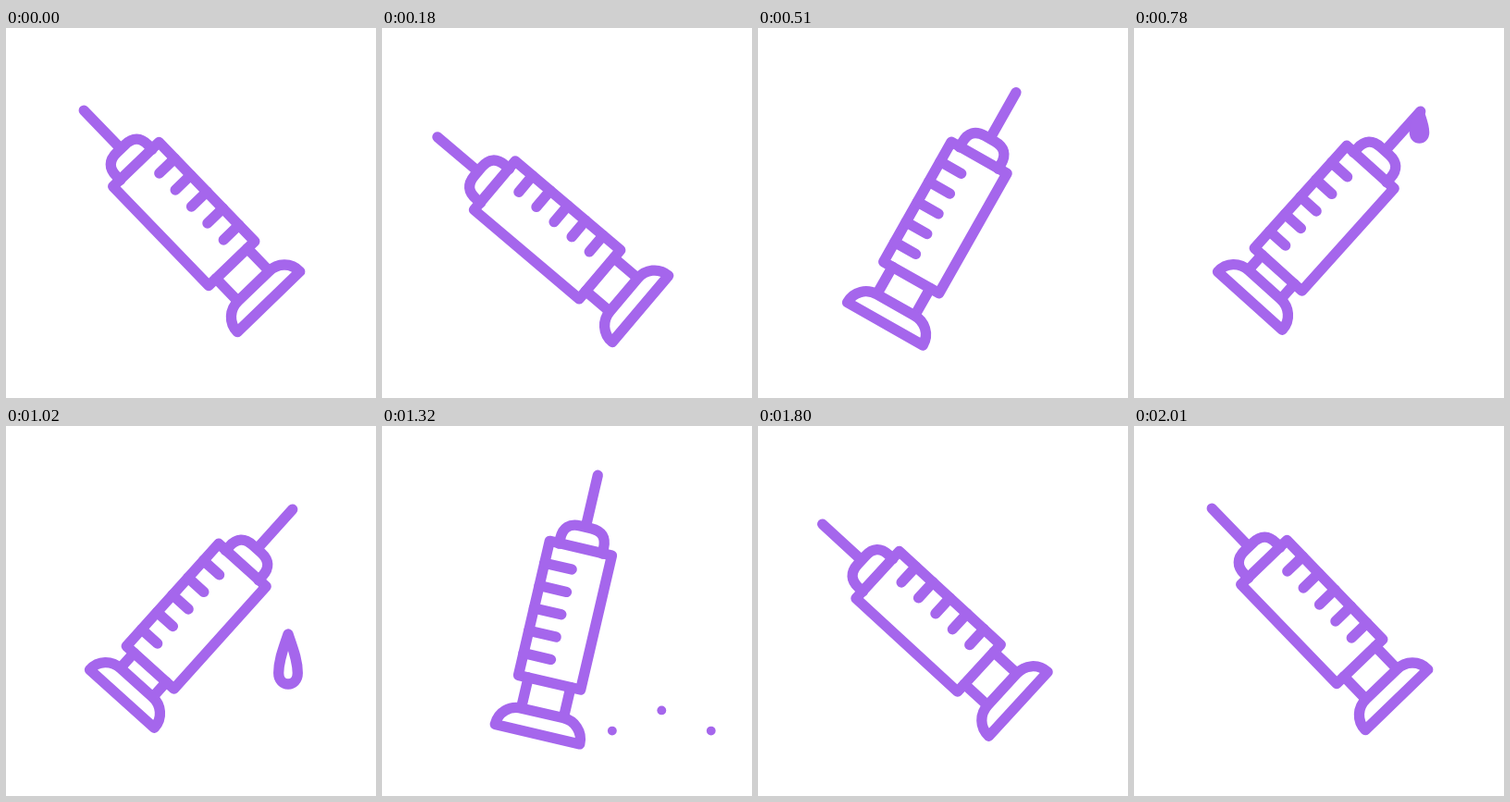
These frames come from a looping animation (400 by 400 pixels, 2.17 s). An HTML page with a canvas:

```html
<!DOCTYPE html>
<html>
<head>
<meta charset="utf-8">
<style>
html, body { margin: 0; width: 100%; height: 100%; overflow: hidden; background: #fff; }
canvas { display: block; width: 400px; height: 400px; }
</style>
</head>
<body>
<canvas id="stage" width="400" height="400"></canvas>
<script>
const LOOP = 2170, STEP = 30, LAST = 2010;
const ctx = document.getElementById('stage').getContext('2d');

// Poses: angle in degrees, then the centre of the barrel.
const REST = [-44, 192.25, 201];
const WOUND = [-49.8, 178.5, 218.5];
const RIGHT = [42, 205.7, 205.7];

const BARREL = new Path2D('M-34.5-74.5H34.5V74.5H-34.5Z');
const CAP = new Path2D('M0-155.5V-98M-24-74V-80Q-24-98-6-98H6Q24-98 24-80V-74');
const FLANGE = new Path2D('M-47 132C-47 118-36 108.5-23 108.5H23C36 108.5 47 118 47 132Z');
const DROP = new Path2D('M0 0C-5 15-10.3 28-10.3 42C-10.3 58 10.3 58 10.3 42C10.3 28 5 15 0 0Z');

const clamp = (v, lo, hi) => Math.min(hi, Math.max(lo, v));
const progress = (t, from, to) => clamp((t - from) / (to - from), 0, 1);
const ease = (t, from, to) => {
  const u = progress(t, from, to);
  return u * u * (3 - 2 * u);
};
const mix = (a, b, k) => a.map((v, i) => v + (b[i] - v) * k);

function line(x1, y1, x2, y2) {
  ctx.beginPath();
  ctx.moveTo(x1, y1);
  ctx.lineTo(x2, y2);
  ctx.stroke();
}

function syringe(t) {
  const swing = ease(t, 195, 605) - ease(t, 1147, 1610);
  const wound = ease(t, 0, 190) - ease(t, 1635, 2010);
  const push = 12 * (ease(t, 605, 770) - ease(t, 1130, 1300));
  const [angle, x, y] = mix(mix(REST, WOUND, wound), RIGHT, swing);
  const arc = Math.sin(Math.PI * swing);

  ctx.save();
  ctx.translate(x + arc, y - 6 * arc);
  ctx.rotate(angle * Math.PI / 180);
  ctx.stroke(CAP);
  ctx.stroke(BARREL);

  // The scale crosses from one wall to the other in mid swing.
  const inner = 11.5 - 23 * swing;
  const outer = 34.5 * clamp((0.5 - swing) * 10, -1, 1);
  for (let row = -50; row <= 50; row += 25) line(inner, row, outer, row);

  for (const side of [-23.5, 23.5]) line(side, 74.5, side, 108 - push);
  ctx.translate(0, -push);
  ctx.stroke(FLANGE);
  ctx.restore();
}

function drop(t) {
  if (t < 660 || t > 1090) return;
  const size = ease(t, 640, 920);
  const fall = Math.max(0, (t - 790) / 230) ** 2;
  const shape = new Path2D();
  shape.addPath(DROP, new DOMMatrix([size, 0, 0, size, 308.5 - 3.5 * Math.min(1, fall), 92 + 133 * fall]));
  ctx.stroke(shape);
}

function splash(t) {
  const u = progress(t, 1095, 1440);
  if (u === 0 || u === 1) return;
  const reach = 86 * (1 - (1 - u) ** 2);
  for (const turn of [-1, 0, 1]) {
    const a = turn * Math.PI / 4;
    ctx.beginPath();
    ctx.arc(302.3 + reach * Math.sin(a), 383 - reach * Math.cos(a), 6 * (1 - u ** 4), 0, 2 * Math.PI);
    ctx.fill();
  }
}

function draw(now) {
  const t = Math.min(LAST, Math.floor(now % LOOP / STEP) * STEP);
  ctx.clearRect(0, 0, 400, 400);
  ctx.strokeStyle = ctx.fillStyle = '#a566ec';
  ctx.lineWidth = 11.3;
  ctx.lineCap = ctx.lineJoin = 'round';
  syringe(t);
  drop(t);
  splash(t);
}

const start = performance.now();
function tick() {
  draw(performance.now() - start);
  requestAnimationFrame(tick);
}
tick();
</script>
</body>
</html>
```
